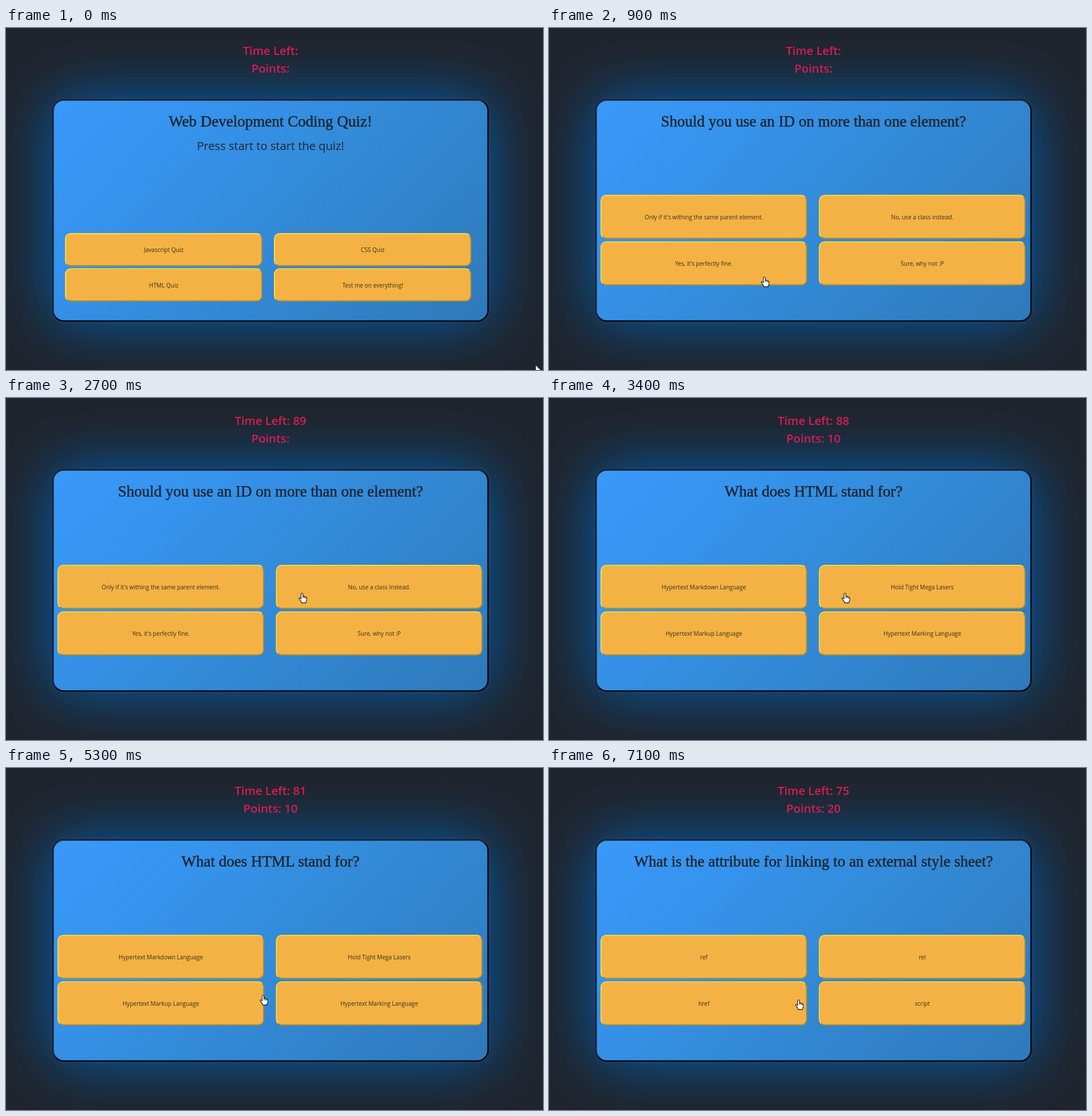
An HTML page for the animation above (7200 ms loop, 938 px wide and 597 px high).

```html
<!DOCTYPE html>
<html lang="en">
<head>
<meta charset="utf-8">
<title>Coding quiz</title>
<style>
html, body { margin: 0; width: 100%; height: 100%; overflow: hidden; background: #20242c; }
svg { display: block; }
text { text-anchor: middle; font-family: "Open Sans", "Noto Sans", sans-serif; }
.score { font-size: 20.2px; font-weight: 600; fill: #d91c50; }
.title { font-family: "Liberation Serif", "Times New Roman", serif; font-size: 27px; fill: #1c2733; stroke: #1c2733; stroke-width: .55px; }
.lead { font-size: 20.1px; fill: #1c2733; }
.label { font-size: 10.1px; fill: #35301f; }
</style>
</head>
<body>
<svg id="stage" width="938" height="597" viewBox="0 0 938 597">
  <defs>
    <linearGradient id="blue" gradientUnits="userSpaceOnUse" x1="176" y1="33" x2="748" y2="605">
      <stop offset="0" stop-color="#3a99f9"/>
      <stop offset=".22" stop-color="#3694ef"/>
      <stop offset=".5" stop-color="#338bd9"/>
      <stop offset="1" stop-color="#2f79ba"/>
    </linearGradient>
    <filter id="blur" filterUnits="userSpaceOnUse" x="-250" y="-250" width="1438" height="1097">
      <feGaussianBlur stdDeviation="52"/>
    </filter>
  </defs>
  <rect width="938" height="597" fill="#20242c"/>
  <rect x="77" y="120" width="770" height="397" rx="24" fill="#0b5aa6" filter="url(#blur)"/>
  <text id="time" class="score" x="462" y="47"/>
  <text id="points" class="score" x="462" y="78"/>
  <g id="card"></g>
  <text id="title" class="title" x="462" y="172"/>
  <text id="lead" class="lead" x="462" y="212.5">Press start to start the quiz!</text>
  <g id="menu"></g>
  <g id="answers"></g>
  <g id="arrow">
    <path d="M0 0V15.5L3.6 12.2L6.2 18L8.8 16.8L6.3 11.2H11Z" fill="#fff" stroke="#111820" stroke-width="1"/>
  </g>
  <g id="hand">
    <path d="M-1.6 1.2Q-1.5 -.2 0 -.2Q1.6 -.2 1.6 1.3V5.4Q3.2 4.6 4.1 5.9Q5.7 5.3 6.4 6.7Q8.3 6.4 8.3 8.4V11.6Q8.2 13.2 6.9 14.4V16.6H-1V14.8L-5 9.6Q-5.6 8 -4.3 7.7Q-3.2 7.6 -1.6 9.8Z"
      fill="#fff" stroke="#15181c" stroke-width="1.1" stroke-linejoin="round"/>
    <path d="M1.6 5.4V8.6M4.1 6V8.8M6.4 6.8V9.2" fill="none" stroke="#15181c" stroke-width=".9"/>
  </g>
</svg>
<script>
const $ = id => document.getElementById(id);
const LOOP = 7200, STEP = 100;

// A rounded box with a light upper-left and a dark lower-right edge
function bevel(x, y, w, h, r, fill, light, dark, line) {
  const k = r * .293, x2 = x + w, y2 = y + h;
  const edge = `M${x + k} ${y2 - k}A${r} ${r} 0 0 1 ${x} ${y2 - r}V${y + r}` +
    `A${r} ${r} 0 0 1 ${x + r} ${y}H${x2 - r}A${r} ${r} 0 0 1 ${x2 - k} ${y + k}`;
  return `<rect x="${x}" y="${y}" width="${w}" height="${h}" rx="${r}" fill="${fill}" stroke="${dark}" stroke-width="${line}"/>` +
    `<path d="${edge}" fill="none" stroke="${light}" stroke-width="${line}"/>`;
}

const boxes = (xs, ys, w, h) => ys.flatMap(y => xs.map(x => ({ x, y, w, h })));
const menuBoxes = boxes([103.5, 468.5], [358.5, 420], 344, 57);
const answerBoxes = boxes([90.5, 472], [291.7, 373], 360, 76);

function button(b, label = "") {
  return bevel(b.x + .5, b.y + .5, b.w - 1, b.h - 1, 9, "#f4b244", "#f9dc4e", "#a98b36", 2) +
    `<text class="label" x="${b.x + b.w / 2}" y="${b.y + b.h / 2 + 4.2}">${label}</text>`;
}

$("card").innerHTML = bevel(82, 125.5, 760, 386, 19, "url(#blue)", "#172a40", "#050b14", 2.6);
const menuLabels = ["Javascript Quiz", "CSS Quiz", "HTML Quiz", "Test me on everything!"];
$("menu").innerHTML = menuBoxes.map((b, i) => button(b, menuLabels[i])).join("");
$("answers").innerHTML = answerBoxes.map(b => button(b)).join("");
const labels = [...$("answers").querySelectorAll("text")];

const screens = [
  { at: 0, title: "Web Development Coding Quiz!" },
  { at: 800, title: "Should you use an ID on more than one element?",
    answers: ["Only if it's withing the same parent element.", "No, use a class instead.", "Yes, it's perfectly fine.", "Sure, why not :P"] },
  { at: 2800, title: "What does HTML stand for?",
    answers: ["Hypertext Markdown Language", "Hold Tight Mega Lasers", "Hypertext Markup Language", "Hypertext Marking Language"] },
  { at: 5800, title: "What is the attribute for linking to an external style sheet?",
    answers: ["ref", "rel", "href", "script"] }
];
const clock = [[0, ""], [1900, 89], [3000, 88], [4100, 87], [4800, 82], [5200, 81], [6200, 80], [6700, 75]];
const score = [[0, ""], [2800, 10], [5800, 20]];
// time, x, y of the pointer tip
const path = [
  [0, 925, 588], [100, 925, 588], [600, 376, 435], [1000, 376, 435], [1700, 394, 350], [2100, 394, 350],
  [2600, 517, 341], [3500, 517, 341], [4200, 407, 337], [4800, 407, 337], [5300, 449, 397],
  [5600, 436, 405], [7200, 436, 405]
];

const latest = (list, t) => list.filter(e => e[0] <= t).pop()[1];

function pointer(t) {
  const i = Math.max(1, path.findIndex(p => p[0] > t));
  const [t0, x0, y0] = path[i - 1], [t1, x1, y1] = path[i];
  const u = (t - t0) / (t1 - t0), e = u * u * (3 - 2 * u);
  return [x0 + (x1 - x0) * e, y0 + (y1 - y0) * e];
}

const show = (el, on) => el.setAttribute("visibility", on ? "visible" : "hidden");
const inside = (b, x, y) => x >= b.x && x <= b.x + b.w && y >= b.y && y <= b.y + b.h;

function draw(t) {
  const screen = screens.filter(s => s.at <= t).pop();
  const asking = !!screen.answers;
  $("time").textContent = `Time Left: ${latest(clock, t)}`.trim();
  $("points").textContent = `Points: ${latest(score, t)}`.trim();
  $("title").textContent = screen.title;
  show($("lead"), !asking);
  show($("menu"), !asking);
  show($("answers"), asking);
  if (asking) labels.forEach((el, i) => { el.textContent = screen.answers[i]; });

  const [x, y] = pointer(t);
  const over = (asking ? answerBoxes : menuBoxes).some(b => inside(b, x, y));
  for (const id of ["hand", "arrow"]) {
    $(id).setAttribute("transform", `translate(${x.toFixed(1)} ${y.toFixed(1)})`);
    show($(id), (id === "hand") === over);
  }
}

const start = performance.now();
function tick() {
  const t = (performance.now() - start) % LOOP;
  draw(Math.floor(t / STEP) * STEP);
  requestAnimationFrame(tick);
}
tick();
</script>
</body>
</html>
```
